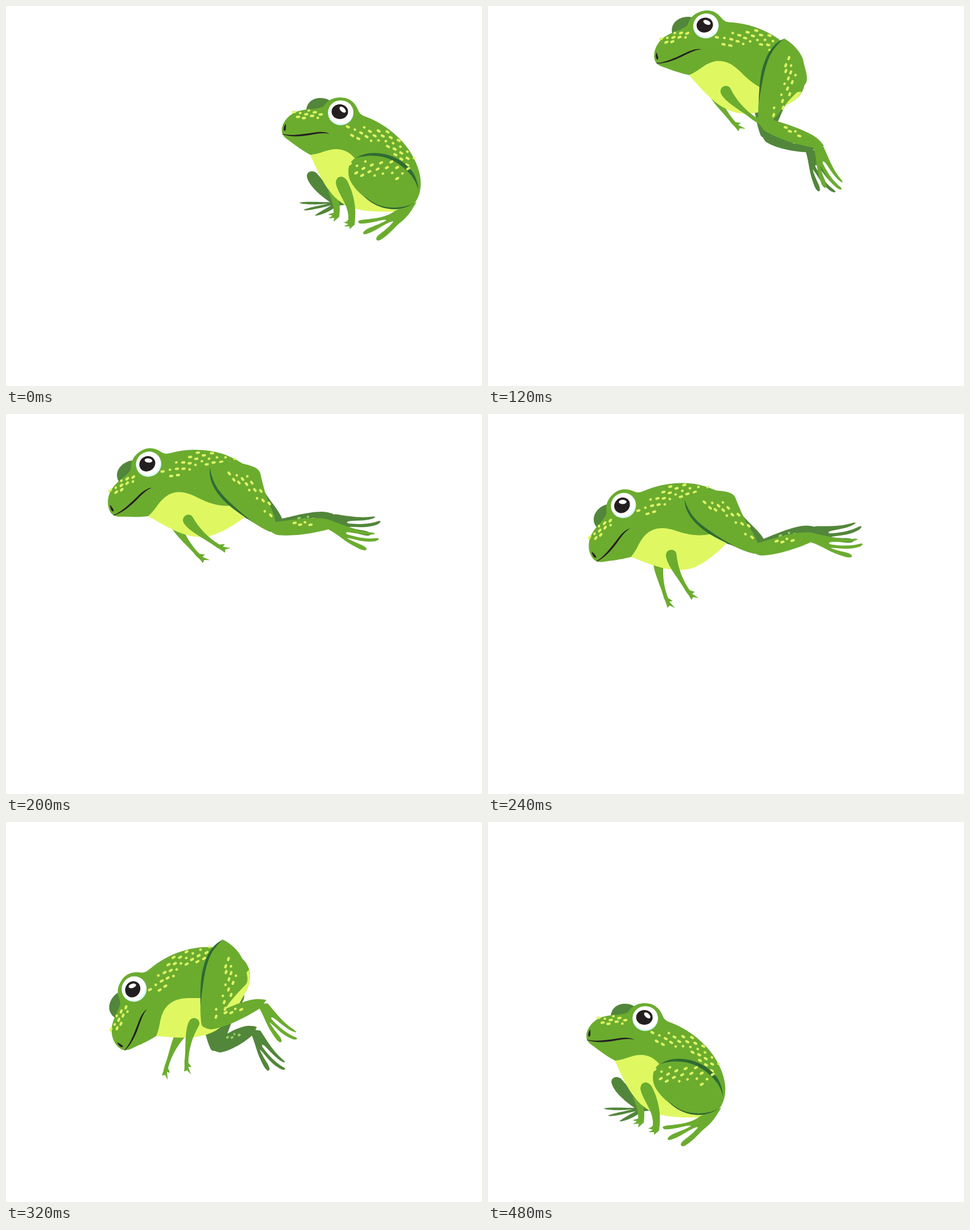
Animation, 837 px wide and 669 px high, one loop 2000 ms. Source, as an HTML page:

```html
<!DOCTYPE html>
<html lang="en">
<head>
<meta charset="utf-8">
<title>Jumping frog</title>
<style>
  html, body { margin: 0; width: 100%; height: 100%; overflow: hidden; background: #fff; }
  svg { display: block; width: 837px; height: 669px; }
  .skin { fill: #6bac2f; }
  .far { fill: #52863a; }
  .shade { fill: #2f6b33; }
  .belly { fill: #dff862; }
  .ink { fill: #231f20; }
  .spots { fill: none; stroke: #dff564; stroke-width: 4.2; stroke-linecap: round; }
  .far .spots { stroke: #92cf60; }
</style>
</head>
<body>
<svg viewBox="0 0 837 669">
  <defs>
    <path id="thighShape" d="M400 66C415 60 435 58 450 64C463 72 484 76 486 90C487 105 488 118 490 130C494 150 500 168 499 180C498 192 492 197 486 194C470 184 450 165 437 150C415 124 398 100 400 66Z"/>
    <path id="shinShape" d="M488 178C510 180 550 178 580 185C592 188 600 193 606 198L588 206C560 209 520 209 497 201C488 196 482 188 488 178Z"/>
    <path id="footShape" d="M584 203C600 212 612 230 628 242C636 248 642 253 648 253C653 250 645 244 638 240C628 234 620 228 618 226C632 230 645 240 668 240C677 238 674 235 668 235C648 234 628 224 620 220C616 216 620 216 624 217C640 222 655 229 668 227C668 225 664 224 660 223C640 218 620 205 604 196Z"/>
    <path id="armShape" d="M-8 1C-8 -12 11 -13 11 1C13 20 20 42 34 62L43 65L38 68L50 76L40 74L37 79L33 72L27 64C18 46 -6 20 -8 1Z"/>
  </defs>

  <g id="frog">
    <path class="far" d="M528 183C529 168 542 161 555 162C566 163 572 167 572 172L560 183Z"/>

    <g class="far sit">
      <path d="M529 300C529 290 540 289 546 294L590 345L597 350L580 352C560 340 532 318 529 300Z"/>
      <path d="M578 345C560 346 530 343 516 346C518 350 545 350 566 348C550 352 530 355 523 359C528 362 555 355 572 351C562 357 548 364 543 369C550 370 570 362 579 354Z"/>
    </g>
    <g class="far jump">
      <use id="farFoot" href="#footShape"/>
      <use id="farThigh" href="#thighShape"/>
      <g id="farShin"><use href="#shinShape"/><path class="spots" id="farShinSpots"/></g>
    </g>

    <path class="skin sit" d="M566 325C572 340 577 350 576 364L566 367L574 369L567 374L577 373L576 380L586 371C587 360 588 350 584 340Z"/>
    <use class="skin jump" id="farArm" href="#armShape"/>

    <path class="skin" d="M485 221C484 206 497 190 514 185C530 180 548 183 558 177C566 166 574 161 588 161C604 161 614 170 619 183C622 190 625 192 633 195C660 205 690 226 709 254C724 277 731 300 729 318C728 336 720 346 712 352C700 360 690 362 680 362L600 330L550 290L535 262C518 253 505 242 495 235Q486 229 485 221Z"/>
    <path class="belly" d="M535 262C556 260 563 252 582 252C603 253 614 267 622 281C632 300 643 319 664 331C680 341 700 344 716 348C705 358 694 362 680 362C650 363 622 361 602 353C568 338 552 300 535 262Z"/>
    <path class="spots" id="headSpots"/>
    <path class="spots" id="backSpots"/>

    <path class="ink" d="M486 225C500 229 520 226 540 223C552 221 562 221 569 225C560 223 552 224 540 226C520 230 500 231 486 226Z"/>
    <path class="ink" d="M492 207C488 212 487 219 490 220C493 219 492 213 492 207Z"/>
    <ellipse cx="588.5" cy="188" rx="22.5" ry="21.8" fill="#dcf8fa"/>
    <ellipse cx="589" cy="186.500" rx="21.5" ry="20" fill="#fff"/>
    <ellipse class="ink" cx="587" cy="186" rx="14.5" ry="13"/>
    <ellipse cx="592" cy="182.500" rx="6.800" ry="3.700" fill="#fff" transform="rotate(42 592 182.500)"/>

    <path class="skin sit" d="M580 312C580 298 594 297 600 308C609 324 616 350 614 373L613 385L604 393L604 388L594 388L602 384L593 381C598 381 602 378 602 374C603 350 583 330 580 312Z"/>
    <g class="sit">
      <path class="skin" d="M722 345C712 362 706 372 690 384C678 396 664 411 655 413C648 412 651 406 658 401C668 394 676 386 681 380C680 377 670 383 664 386C652 393 640 401 630 402C625 400 630 395 638 391C650 386 664 381 669 377C665 374 640 384 622 383C616 379 620 377 630 376C650 374 670 372 685 360Z"/>
      <path class="skin" d="M602 292C602 275 612 264 632 262C665 260 700 275 716 302C722 312 728 325 722 342C716 352 700 357 690 358C650 357 622 332 612 318C604 308 602 300 602 292Z"/>
      <path class="shade" d="M615 268C640 250 690 258 715 292C722 303 725 315 725 325C722 310 715 300 705 290C680 264 645 258 615 268Z"/>
      <path class="shade" d="M629 334C650 358 690 367 718 346C700 357 670 358 650 348C640 343 635 338 629 334Z"/>
      <path class="spots" id="sitSpots"/>
    </g>

    <g class="jump">
      <use class="skin" id="foot" href="#footShape"/>
      <g id="shin"><use class="skin" href="#shinShape"/><path class="spots" id="shinSpots"/></g>
      <g id="thigh">
        <use class="skin" href="#thighShape"/>
        <path class="shade" d="M400 66C395 85 398 105 421 135Q437 154 460 173C434 144 411 118 404 95C401 85 400 75 400 66Z"/>
        <path class="spots" id="thighSpots"/>
      </g>
      <use class="skin" id="arm" href="#armShape"/>
    </g>
  </g>
</svg>

<script>
const $ = id => document.getElementById(id);
const STEP = 40, LAST = 12, LOOP = 2000;
const GOLDEN = 0.618;

// Joints as they lie in the drawn shapes
const EYE = [587, 185], HIP = [461.5, 122.5], KNEE = [491, 189], ANKLE = [595, 202];

// Body keys, one per 80 ms: eye position, body tilt, arm angle
const keys = [
  [587, 185, 0, 19], [479, 66, -9, 2], [292, 42, -26.4, -35], [235, 160, -44.2, 0],
  [222, 294, -61, 36], [225, 393, -51.7, 16], [275, 343, 0, 19]
];

function turn([x, y], deg) {
  const a = deg * Math.PI / 180, c = Math.cos(a), s = Math.sin(a);
  return [x * c - y * s, x * s + y * c];
}

// Speckles spread evenly over a band that follows a quadratic curve
function speckle(id, count, [p, q, r], spread, tilt) {
  let d = '';
  for (let i = 0; i < count; i++) {
    const t = (i + 0.5) / count, u = 1 - t;
    const off = spread * (2 * (i * GOLDEN % 1) - 1);
    const point = n => u * u * p[n] + 2 * u * t * q[n] + t * t * r[n];
    const slope = n => u * (q[n] - p[n]) + t * (r[n] - q[n]);
    const norm = off / Math.hypot(slope(0), slope(1));
    const [dx, dy] = turn([i % 3 === 2 ? 0.6 : 3.4, 0], tilt);
    d += `M${point(0) - slope(1) * norm - dx / 2} ${point(1) + slope(0) * norm - dy / 2}l${dx} ${dy}`;
  }
  $(id).setAttribute('d', d);
}
speckle('headSpots', 10, [[506, 195], [530, 189], [556, 190]], 8, -6);
speckle('backSpots', 28, [[600, 226], [680, 214], [711, 280]], 13, 30);
speckle('sitSpots', 19, [[608, 293], [650, 275], [706, 298]], 15, -30);
speckle('thighSpots', 16, [[430, 92], [476, 85], [489, 172]], 10, 60);
for (const id of ['shinSpots', 'farShinSpots']) {
  speckle(id, 4, [[528, 190], [545, 188], [564, 191]], 4, 0);
}

// Key values at a step; steps between keys lie on an outward bowed curve
function poseAt(step) {
  const i = step >> 1;
  if (step % 2 === 0) return keys[i];
  const bow = 0.09;
  const [a, b, c, d] = [-1, 0, 1, 2].map(n => keys[Math.min(Math.max(i + n, 0), keys.length - 1)]);
  return b.map((v, n) => (0.5 + bow) * (v + c[n]) - bow * (a[n] + d[n]));
}

function place(id, [x, y], deg, [px, py], squash = 1) {
  $(id).setAttribute('transform',
    `translate(${x} ${y}) rotate(${deg}) scale(${squash} 1) translate(${-px} ${-py})`);
}

// Where the next joint lands when a bone is turned about the previous one
function reach(at, from, to, deg, squash = 1) {
  const [x, y] = turn([(to[0] - from[0]) * squash, to[1] - from[1]], deg);
  return [at[0] + x, at[1] + y];
}

function poseLeg([thigh, shin, foot], hip, [thighTurn, shinTurn, footTurn], squash) {
  const knee = reach(hip, HIP, KNEE, thighTurn);
  const ankle = reach(knee, KNEE, ANKLE, shinTurn, squash);
  place(thigh, hip, thighTurn, HIP);
  place(shin, knee, shinTurn, KNEE, squash);
  place(foot, ankle, footTurn, ANKLE);
}

function show(selector, on) {
  document.querySelectorAll(selector).forEach(el => { el.style.display = on ? '' : 'none'; });
}

function draw(step) {
  const sitting = step === 0 || step === LAST;
  show('.sit', sitting);
  show('.jump', !sitting);

  const [x, y, tilt, swing] = poseAt(step);
  place('frog', [x, y], tilt, EYE);

  // Legs are straight (0) in mid-air and fold up towards both ends of the jump
  const fold = Math.min(1.5, Math.max(0, Math.abs(step / 2 - 2.5) - 0.5));
  const thigh = 26.4 + 82.5 * fold;
  const shin = 26.4 + 20 * fold - 12 * fold * fold;
  poseLeg(['thigh', 'shin', 'foot'], [703 - 36 * fold, 333 - 11 * fold],
    [thigh, shin, 26 + 55 * fold], 1);
  poseLeg(['farThigh', 'farShin', 'farFoot'], [700 - 65 * fold, 338],
    [thigh - 14, shin - 6, 14 + 74 * fold], 0.87 - 0.15 * fold);

  place('arm', [587, 308], swing - tilt, [0, 0]);
  place('farArm', [566, 298], swing - tilt + 14, [0, 0]);
}

let shown = -1;
const start = performance.now();
function tick() {
  const time = (performance.now() - start) % LOOP;
  const step = Math.min(LAST, Math.floor(time / STEP));
  if (step !== shown) draw(shown = step);
  requestAnimationFrame(tick);
}
tick();
</script>
</body>
</html>
```
